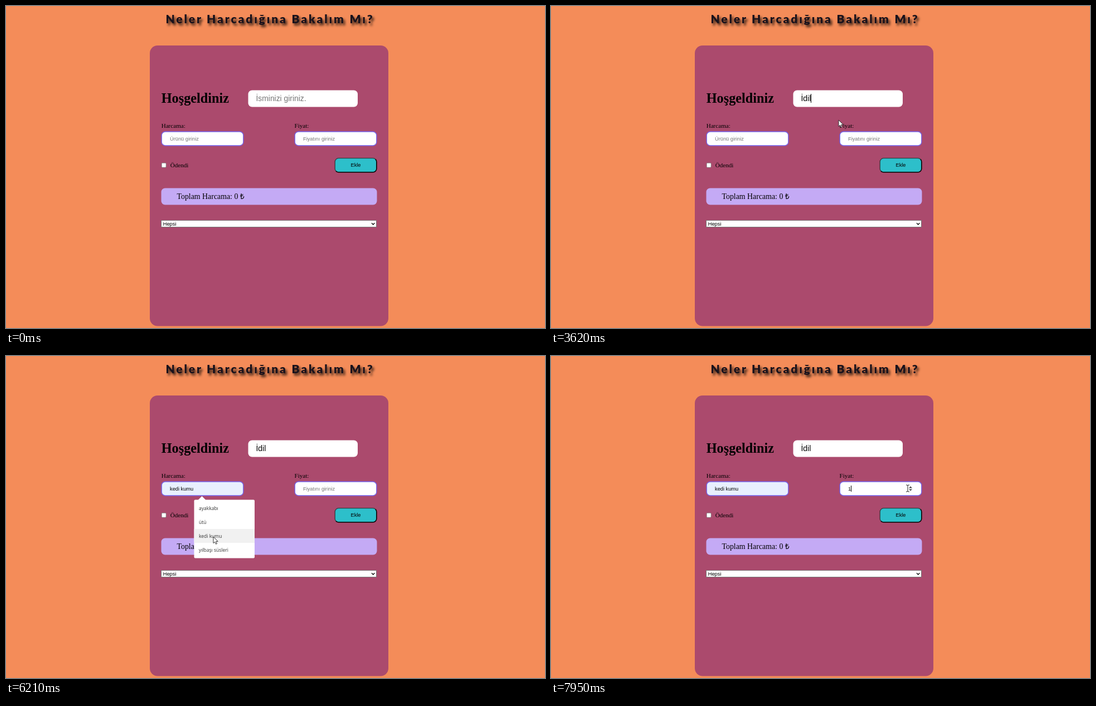
These frames come from a looping animation (967x579 px, 8 s). An HTML page:

```html
<!DOCTYPE html>
<html lang="tr">
<head>
<meta charset="utf-8">
<title>Harcama</title>
<style>
  html, body { margin: 0; width: 100%; height: 100%; overflow: hidden; background: #f48c59; }
  h1 {
    position: absolute; top: 9.8px; left: 0; width: 947px; margin: 0;
    font: 900 21px Lato, sans-serif; letter-spacing: 2.85px; text-align: center; white-space: nowrap;
    color: #19121c; text-shadow: 3px 4px 4px rgba(0, 0, 0, .8);
  }
  svg { position: absolute; left: 0; top: 0; display: block; }
  text { font-family: "Liberation Sans", Arial, sans-serif; font-size: 9.25px; white-space: pre; }
  .serif { font-family: "Liberation Serif", "Times New Roman", serif; font-size: 11.1px; }
  .welcome { font-size: 24.28px; font-weight: 700; }
  .big { font-size: 13.87px; }
  .hint { fill: #757575; }
  .field { fill: #fff; stroke: #7565ee; stroke-width: 1.4; }
  #popup text { font-family: "Open Sans", sans-serif; font-size: 8.5px; fill: #333; }
</style>
</head>
<body>
<svg width="967" height="579" viewBox="0 0 967 579">
  <rect x="258" y="71" width="428" height="504.5" rx="14" fill="#ab4a6d"/>

  <text class="serif welcome" x="278.7" y="174">Hoşgeldiniz</text>
  <rect x="434.5" y="151.5" width="196.5" height="30" rx="7" fill="#fff"/>
  <text id="name" class="big" x="448.5" y="171"></text>

  <text class="serif" x="278.7" y="219">Harcama:</text>
  <rect id="itemBox" class="field" x="279.2" y="226" width="146.6" height="25" rx="6.5"/>
  <text id="item" x="294" y="241.8"></text>

  <text class="serif" x="517.5" y="219">Fiyat:</text>
  <rect class="field" x="518.2" y="226" width="146.6" height="25" rx="6.5"/>
  <text id="price" x="533" y="241.8"></text>
  <path id="spinner" d="M642 237.4l3-3.2 3 3.2zM642 239.4l3 3.2 3-3.2z" fill="#444"/>

  <rect x="279.2" y="282.2" width="8" height="8" rx="1.5" fill="#fff" stroke="#767676" stroke-width=".8"/>
  <text class="serif" x="294.8" y="290">Ödendi</text>

  <rect x="590.2" y="273.7" width="74.6" height="25.2" rx="6.5" fill="#2dbfca" stroke="#333c40" stroke-width="1.3"/>
  <path d="M592 297a6.5 6.5 0 0 0 4.7 1.9H658.3a6.5 6.5 0 0 0 6.5-6.5V280.2a6.5 6.5 0 0 0-1.9-4.6" fill="none" stroke="#000" stroke-width="1.4"/>
  <text x="627.5" y="289.4" text-anchor="middle">Ekle</text>

  <rect x="278.5" y="327.5" width="387" height="30" rx="7" fill="#c4aaf5"/>
  <text class="serif big" x="306.5" y="347">Toplam Harcama: 0 ₺</text>

  <rect x="278.5" y="385.5" width="386" height="12" fill="#fff" stroke="#767676"/>
  <text x="281.8" y="394.8">Hepsi</text>
  <path d="M656 390.3l2.7 2.7 2.7-2.7" fill="none" stroke="#000" stroke-width="1.3"/>

  <g id="popup">
    <path d="M344.5 259l7-7 7 7z" fill="#fff"/>
    <rect x="337.5" y="258.5" width="108.5" height="105" rx="2" fill="#fff"/>
    <rect id="hover" x="337.5" width="108.5" height="25" fill="#f1f1f1"/>
  </g>

  <rect id="caret" width="1"/>
  <g id="cursor">
    <circle id="click" r="8.5" fill="#fff01e" opacity=".72"/>
    <path id="arrow" d="M0 0V11.6L2.7 9.2 4.5 13.3 6.5 12.4 4.7 8.4H8.2Z" fill="#fff" stroke="#222" stroke-width=".9"/>
    <path id="beam" d="M-3-6H-1L0-5.2 1-6H3M-3 6H-1L0 5.2 1 6H3M0-5.2V5.2" fill="none" stroke="#222"/>
  </g>
</svg>
<h1>Neler Harcadığına Bakalım Mı?</h1>

<script>
const LOOP = 8000, BLINK = 530, CLICK = 130;
const ITEMS = ["ayakkabı", "ütü", "kedi kumu", "yılbaşı süsleri"];
const ROW_TOP = 261, ROW = 25;
const OPEN = 4420, PICK = 6470;

const START = { x: 864, y: 470 };
const MOVES = [
  { from: 320, to: 1020, x: 483, y: 164 },
  { from: 3470, to: 3600, x: 516, y: 205 },
  { from: 3630, to: 4090, x: 362, y: 239 },
  { from: 4420, to: 4980, x: 388, y: 361.5 },
  { from: 5300, to: 5450, x: 388, y: 344 },
  { from: 5650, to: 6200, x: 372, y: 325 },
  { from: PICK, to: 7020, x: 620, y: 243 },
  { from: 7140, to: 7400, x: 640, y: 238 }
];
const CLICKS = [1150, 4230, 6340, 7480];

// Focus changes and typing; each one restarts the caret blink
const EDITS = [
  { at: 1150, field: "name", value: "" },
  { at: 2470, field: "name", value: "İ" },
  { at: 2870, field: "name", value: "İd" },
  { at: 3000, field: "name", value: "İdi" },
  { at: 3220, field: "name", value: "İdil" },
  { at: 4230, field: "item", value: "" },
  { at: PICK, field: "item", value: ITEMS[2] },
  { at: 7480, field: "price", value: "" },
  { at: 7950, field: "price", value: "1" }
];

const $ = id => document.getElementById(id);
const show = (id, on) => $(id).setAttribute("display", on ? "inline" : "none");
const set = (id, attrs) => Object.entries(attrs).forEach(([k, v]) => $(id).setAttribute(k, v));
const ease = f => f * f * (3 - 2 * f);

ITEMS.forEach((label, i) => {
  const row = document.createElementNS("http://www.w3.org/2000/svg", "text");
  row.setAttribute("x", 346);
  row.setAttribute("y", ROW_TOP + 16 + i * ROW);
  row.textContent = label;
  $("popup").append(row);
});

function pointer(t) {
  let { x, y } = START;
  for (const m of MOVES) {
    const f = ease(Math.min(1, Math.max(0, (t - m.from) / (m.to - m.from))));
    x += (m.x - x) * f;
    y += (m.y - y) * f;
  }
  return { x, y };
}

function fill(id, value, hint) {
  const el = $(id), label = value || hint;
  if (el.textContent !== label) el.textContent = label;
  el.classList.toggle("hint", !value);
}

function drawCaret(t, edit, popupOpen) {
  const on = edit && !popupOpen && Math.floor((t - edit.at) / BLINK) % 2 === 0;
  show("caret", on);
  if (!on) return;
  const el = $(edit.field), big = edit.field === "name";
  const width = edit.value ? el.getComputedTextLength() : 0;
  set("caret", {
    x: Math.round(+el.getAttribute("x") + width - .4),
    y: big ? 158 : 233, height: big ? 16 : 11
  });
}

function draw(t) {
  const { x, y } = pointer(t);
  const inside = (l, top, r, b) => x > l && x < r && y > top && y < b;
  const overPrice = inside(518, 225, 665, 251);
  const overText = overPrice || inside(434, 151, 631, 182) || inside(279, 225, 426, 251);
  const popupOpen = t >= OPEN && t < PICK;
  const row = Math.floor((y - ROW_TOP) / ROW);
  const hovered = popupOpen && ITEMS[row];

  const edits = EDITS.filter(e => e.at <= t);
  const valueOf = field => edits.filter(e => e.field === field).at(-1)?.value;
  const item = hovered || valueOf("item");
  fill("name", valueOf("name"), "İsminizi giriniz.");
  fill("item", item, "Ürünü giriniz");
  fill("price", valueOf("price"), "Fiyatını giriniz");
  $("itemBox").style.fill = item ? "#e8f0fe" : "#fff";
  show("spinner", overPrice);

  show("popup", popupOpen);
  show("hover", hovered);
  if (hovered) set("hover", { y: ROW_TOP + row * ROW });
  drawCaret(t, edits.at(-1), popupOpen);

  // Typing the name hides the pointer until it moves again
  show("cursor", t >= 320 && (t < 2470 || t >= 3490));
  show("beam", overText);
  show("arrow", !overText);
  show("click", CLICKS.some(c => t >= c && t < c + CLICK));
  set("cursor", { transform: `translate(${x.toFixed(1)} ${y.toFixed(1)})` });
}

function tick() {
  draw(performance.now() % LOOP);
  requestAnimationFrame(tick);
}
tick();
</script>
</body>
</html>
```
